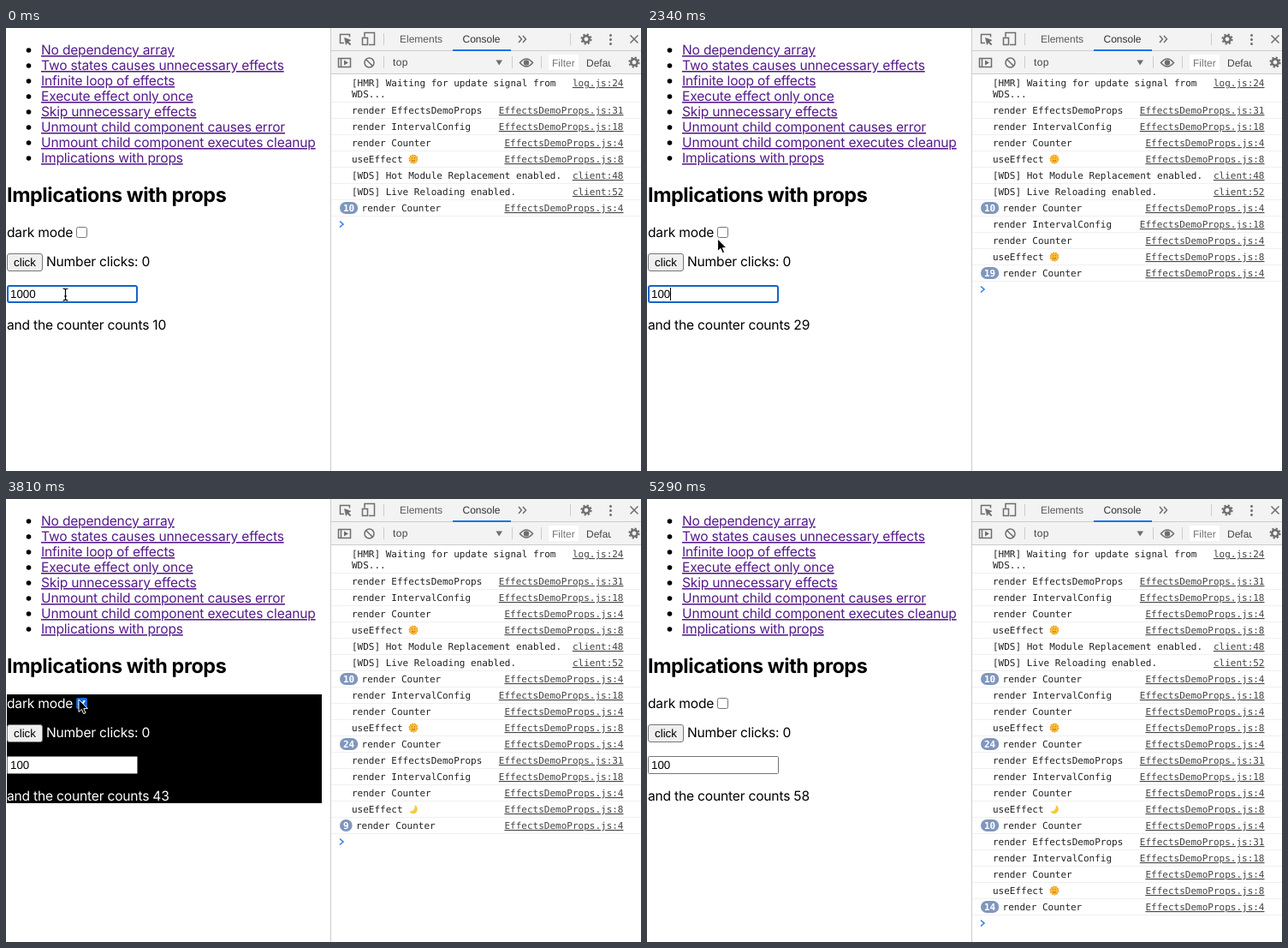
An HTML page that plays this animation: 742 by 517 pixels, repeating every 5.39 s.

```html
<!DOCTYPE html>
<html lang="en">
<head>
<meta charset="utf-8">
<title>Effects demo</title>
<style>
  html, body { margin: 0; width: 100%; height: 100%; overflow: hidden; background: #fff; }
  svg { display: block; text-rendering: geometricPrecision; }
  text { white-space: pre; }
  .page { font: 15.6px Inter, sans-serif; letter-spacing: -.2px; }
  .page h1, .title { font-size: 23.4px; font-weight: 700; letter-spacing: -.43px; }
  .link { fill: #551a8b; text-decoration: underline; }
  .control { font: 13.333px "Liberation Sans", Arial, sans-serif; letter-spacing: 0; fill: #000; }
  .tools { font: 12px "Liberation Sans", Arial, sans-serif; fill: #5a5a5a; }
  .log { font: 11px "DejaVu Sans Mono", monospace; fill: #222; }
  .file { text-anchor: end; text-decoration: underline; fill: #444; }
  .badge { font-weight: 700; fill: #fff; }
  .icon { fill: none; stroke: #6e6e6e; stroke-width: 1.5; }
  .rule { fill: none; stroke: #ccc; }
</style>
</head>
<body>
<svg width="742" height="517" xmlns="http://www.w3.org/2000/svg">
  <defs>
    <g id="gear" class="icon">
      <circle r="3.7" stroke-width="2.6"/>
      <circle r="5.6" stroke-width="2" stroke-dasharray="2.2"/>
    </g>
    <g id="sun">
      <circle r="4.8" fill="#fbbd35" stroke="#f59a23" stroke-width="1.2" stroke-dasharray="2 .9"/>
      <path d="M-2-1.2h1M1-1.2h1M-2 1.5Q0 3.2 2 1.5" fill="none" stroke="#a8601c" stroke-width=".9"/>
    </g>
    <path id="moon" d="M1.5-5A5.3 5.3 0 1 1-5 2.6 5.8 5.8 0 0 0 1.5-5Z" fill="#f8c640"/>
    <path id="arrow" d="M0 0V14.5L3.4 11.4 5.7 16.6 8 15.6 5.8 10.6H10.4Z" fill="#000" stroke="#fff"/>
    <path id="beam" d="M-3-7Q0-7 0-5Q0-7 3-7M0-5V5M-3 7Q0 7 0 5Q0 7 3 7M-1.5 2H1.5" fill="none" stroke="#000" stroke-width="1.2"/>
  </defs>

  <g class="page">
    <g id="links"></g>
    <text class="title" x="1" y="203">Implications with props</text>
    <g id="demo"></g>
  </g>

  <rect x="380" width="362" height="53" fill="#f3f3f3"/>
  <path class="rule" d="M379.5 0V517M380 26.5H742M380 53.5H742M441.5 6V20M441.5 33V47M591.5 33V47M625.5 33V47M659.5 6V20"/>
  <rect x="522" y="25" width="68" height="2" fill="#1a73e8"/>
  <rect x="634" y="31" width="35" height="18" fill="#fff"/>
  <g class="tools">
    <text x="460" y="17">Elements</text>
    <text x="533.5" y="17" fill="#333">Console</text>
    <text x="452" y="44" fill="#444" letter-spacing=".4">top</text>
    <text x="638" y="45" fill="#757575">Filter</text>
    <svg x="677" y="30" width="30" height="20"><text x="1" y="15" fill="#444">Default</text></svg>
    <path d="M572.5 37.5H580L576.2 43.5Z" fill="#6e6e6e"/>
    <g fill="#6e6e6e"><circle cx="706.5" cy="8.5" r="1.5"/><circle cx="706.5" cy="13.5" r="1.5"/><circle cx="706.5" cy="18.5" r="1.5"/></g>
  </g>
  <g class="icon">
    <path d="M395 17.5H390.5V7.5H401.5V10.5"/>
    <path d="M395.5 11.5L403 14.3 400 15.8 403 19 402 20 398.800 17 397.300 19.500Z" fill="#6e6e6e" stroke-width=".6"/>
    <path d="M419 10.500V5.500H430.500V19.500H424M416.500 11.500H422.500V19.500H416.500Z"/>
    <path d="M599 9L602.500 13 599 17M604 9L607.500 13 604 17"/>
    <path d="M729.500 8.500L738.500 17.500M738.500 8.500L729.500 17.500"/>
    <path d="M388.500 35.500H402.500V45.500H388.500ZM391.500 35.500V45.500"/>
    <path d="M395 37.500L400 40.500 395 43.500Z" fill="#6e6e6e" stroke="none"/>
    <circle cx="424.500" cy="40.500" r="5.500"/><path d="M420.700 36.700L428.300 44.300"/>
    <path d="M600.500 40.500Q608 31.500 615.500 40.500Q608 49.500 600.500 40.500Z"/>
    <circle cx="608" cy="40.500" r="2.500" fill="#6e6e6e"/>
  </g>
  <use href="#gear" x="678" y="13"/>
  <use href="#gear" x="734" y="40"/>

  <g class="log">
    <text x="404" y="68">[HMR] Waiting for update signal from</text>
    <text x="404" y="81">WDS...</text>
    <text class="file" x="721.500" y="68">log.js:24</text>
    <path d="M380 86.500H742" stroke="#f0f0f0"/>
    <g id="rows"></g>
  </g>
  <g id="pointer"></g>
</svg>
<script>
const LOOP = 5390, STEP = 147;
const TYPED = 3, PRESSED = 19, DARK = 20, LIGHT = 27, AWAY = 31;
const put = (id, html) => document.getElementById(id).innerHTML = html;
const clamp = (v, lo, hi) => Math.min(hi, Math.max(lo, v));

const demoFile = line => 'EffectsDemoProps.js:' + line;
const props = { text: 'render EffectsDemoProps', file: demoFile(31) };
const config = { text: 'render IntervalConfig', file: demoFile(18) };
const counter = (times = 1) => ({ text: 'render Counter', file: demoFile(4), times });
const effect = emoji => ({ text: 'useEffect', file: demoFile(8), emoji });

put('links', [
  'No dependency array', 'Two states causes unnecessary effects', 'Infinite loop of effects',
  'Execute effect only once', 'Skip unnecessary effects', 'Unmount child component causes error',
  'Unmount child component executes cleanup', 'Implications with props'
].map((label, i) => `<circle cx="26.5" cy="${26 + 18 * i}" r="2.8"/>
  <text class="link" x="41" y="${31 + 18 * i}">${label}</text>`).join(''));

// The interval restarts each time the theme is toggled.
function countAt(step) {
  const t = step * STEP, ticks = from => Math.floor((t - from) / 100);
  if (step < DARK) return 10 + clamp(ticks(370), 0, 24);
  if (step < LIGHT) return 34 + ticks(2830);
  return 45 + ticks(LIGHT * STEP);
}

function logRows(step, count) {
  const rows = [props, config, counter(), effect('sun'),
    { text: '[WDS] Hot Module Replacement enabled.', file: 'client:48' },
    { text: '[WDS] Live Reloading enabled.', file: 'client:52' }, counter(10)];
  if (step >= TYPED) rows.push(config, counter(), effect('sun'), counter(Math.min(count, 34) - 10));
  if (step >= DARK) rows.push(props, config, counter(), effect('moon'), counter(Math.min(count, 44) - 34));
  if (step >= LIGHT) rows.push(props, config, counter(), effect('sun'), counter(count > 45 ? count - 44 : 0));
  return rows.filter(row => row.times !== 0);
}

function drawRow({ text, file, times, emoji }, i) {
  const y = 100 + 19 * i;
  let x = 404, extra = '';
  if (times > 1) {
    const width = 8 + 6.62 * String(times).length;
    x = 394.300 + width;
    extra = `<rect x="390" y="${y - 11}" width="${width}" height="14" rx="7" fill="#8097bd"/>
      <text class="badge" x="394" y="${y}">${times}</text>`;
  }
  if (emoji) extra = `<use href="#${emoji}" x="476" y="${y - 4}"/>`;
  return `${extra}<text x="${x}" y="${y}">${text}</text>
    <text class="file" x="721.500" y="${y}">${file}</text>
    <path d="M380 ${y + 5.500}H742" stroke="#f0f0f0"/>`;
}

function drawDemo(step, count) {
  const dark = step >= DARK && step < LIGHT;
  const focused = step < PRESSED;
  const hover = step >= 17 && step < AWAY;
  const typed = step >= TYPED;
  const caret = focused && step > 0 && Math.floor((step - 1) * STEP / 500) % 2 === 0;
  const box = dark
    ? '<rect x="82" y="232" width="13" height="13" rx="2" fill="#0b68d8"/><path d="M85 238.500L87.500 241.500 92 235" fill="none" stroke="#fff" stroke-width="2"/>'
    : `<rect x="82.500" y="232.500" width="12" height="12" rx="2" fill="#fff" stroke="${hover ? '#4f4f4f' : '#767676'}"/>`;
  const field = focused
    ? '<rect x="2" y="301" width="151" height="19" rx="2" fill="#fff" stroke="#1264c8" stroke-width="2"/>'
    : '<rect x="1.500" y="300.500" width="152" height="20" rx="1" fill="#fff" stroke="#767676"/>';
  return `${dark ? '<rect x="1" y="228" width="368" height="127"/>' : ''}
    <g fill="${dark ? '#fff' : '#000'}">
      <text x="1" y="244">dark mode</text>
      <text x="47" y="278">Number clicks: 0</text>
      <text x="1" y="352">and the counter counts ${count}</text>
    </g>
    ${box}${field}
    <rect x="1.500" y="263.500" width="41" height="20" rx="2.500" fill="#efefef" stroke="#767676"/>
    <text class="control" x="9" y="278">click</text>
    <text class="control" x="5" y="315">${typed ? 100 : 1000}</text>
    ${caret ? `<rect x="${typed ? 27 : 35}" y="303" width="1" height="15"/>` : ''}`;
}

function drawPointer(step) {
  if (step >= AWAY) return '';
  const p = clamp((step - 13) / 4, 0, 1), ease = p * p * (3 - 2 * p);
  const x = 69.500 + 15.500 * ease, y = 311 - 77 * ease;
  return `<use href="#${y > 300 ? 'beam' : 'arrow'}" x="${x}" y="${y}"/>`;
}

let shown = -1;
function draw() {
  const step = Math.min(36, Math.floor((performance.now() % LOOP + 18) / STEP));
  if (step !== shown) {
    shown = step;
    const count = countAt(step), rows = logRows(step, count);
    put('demo', drawDemo(step, count));
    put('rows', rows.map(drawRow).join('') +
      `<path d="M390 ${92.500 + 19 * rows.length}l4 3.500-4 3.500" fill="none" stroke="#367cf1" stroke-width="1.600"/>`);
    put('pointer', drawPointer(step));
  }
  requestAnimationFrame(draw);
}
draw();
</script>
</body>
</html>
```
